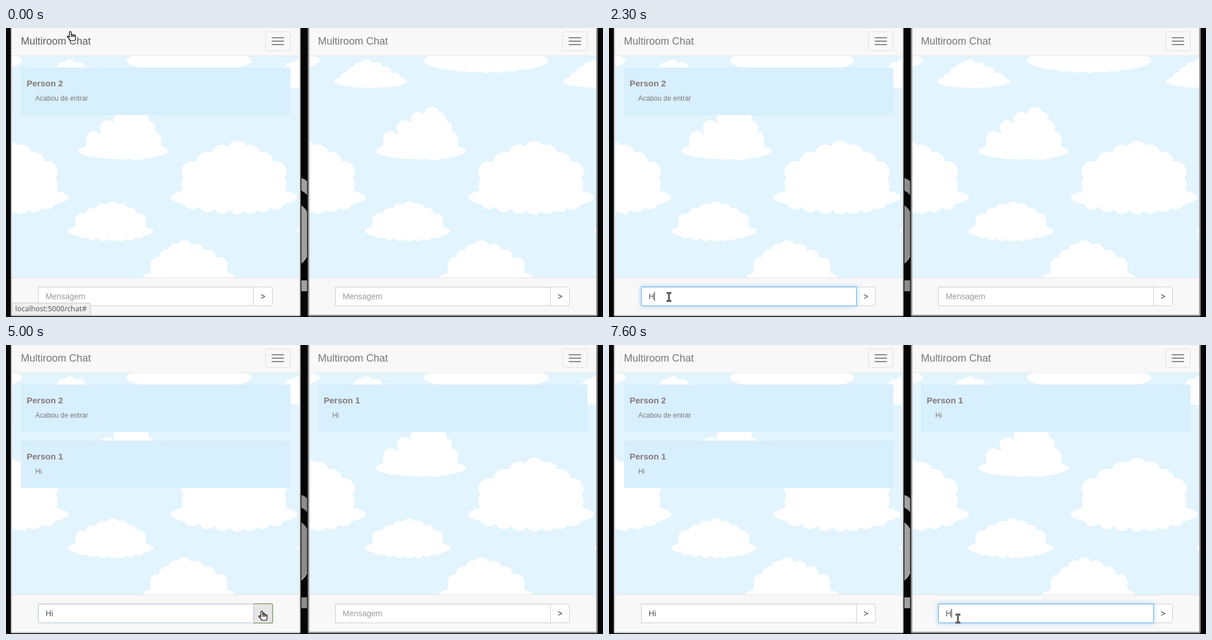
An HTML page that plays this animation: 1041 by 505 pixels, repeating every 8000 ms.

```html
<!DOCTYPE html>
<html lang="pt">
<head>
<meta charset="utf-8">
<title>Multiroom Chat</title>
<style>
  html, body { margin: 0; width: 100%; height: 100%; overflow: hidden; background: #000; }
  svg { display: block; position: absolute; left: 0; top: 0; }
  text { font-family: "Liberation Sans", Arial, sans-serif; font-size: 14px; fill: #555; white-space: pre; }
  .brand { font-size: 18px; fill: #777; }
  .name { font-size: 15px; font-weight: bold; fill: #857879; }
  .body { font-size: 12px; fill: #7d7678; }
  .hint { fill: #999; }
  .send { fill: #333; text-anchor: middle; }
  .status { font-family: "Noto Sans", "Open Sans", sans-serif; font-size: 12.7px; fill: #5a5a5a; }
</style>
</head>
<body>
<svg id="stage" width="1041" height="505" viewBox="0 0 1041 505"></svg>
<script>
const LOOP = 8000, STEP = 100, TILE = 399, SHIFT = 518;

const rect = (x, y, w, h, fill, more = "") =>
  `<rect x="${x}" y="${y}" width="${w}" height="${h}" fill="${fill}" ${more}/>`;
const circle = (x, y, r) => `<circle cx="${x}" cy="${y}" r="${r}"/>`;
const text = (x, y, cls, str, id = "") =>
  `<text x="${x}" y="${y}" class="${cls}" ${id && `id="${id}"`}>${str}</text>`;

// A flat base with a row of puffs falling away from the peak and a row of bumps below
function cloud({ x0, x1, peak, top, base, bottom, slope }) {
  const w = x1 - x0, r = .085 * w, inset = .17 * w, puffs = 7;
  const left = x0 + inset, right = x1 - inset, hull = [];
  let out = `<ellipse cx="${(x0 + x1) / 2}" cy="${base}" rx="${w / 2}" ry="${.09 * w}"/>`;
  for (let i = 0; i < puffs; i++) {
    const u = 2 * i / (puffs - 1) - 1;
    const x = peak + u * (u < 0 ? peak - left : right - peak);
    const y = top + r + (base - top) * slope * Math.abs(u) ** 1.5;
    hull.push([x, y]);
    out += circle(x, y, r) + circle(x, bottom - .8 * r - (bottom - base) * .3 * u * u, .8 * r);
    if (Math.abs(u) === 1) out += circle(x, (y + base) / 2, r);
  }
  hull.push([right, base + r / 2], [left, base + r / 2]);
  return out + `<path d="M${hull.join("L")}z"/>`;
}

const clouds = [
  { x0: 210, x1: 428, peak: 319, top: 0, base: 57, bottom: 79, slope: .3 },
  { x0: 54, x1: 182, peak: 111, top: 55, base: 93, bottom: 104, slope: .6 },
  { x0: 126, x1: 284, peak: 225, top: 138, base: 215, bottom: 231, slope: .55 },
  { x0: 287, x1: 508, peak: 403, top: 197, base: 296, bottom: 326, slope: .36 },
  { x0: 108, x1: 257, peak: 186, top: 303, base: 355, bottom: 373, slope: .4 },
  { x0: 238, x1: 400, peak: 311, top: 371, base: 436, bottom: 460, slope: .45 }
];

const message = (y, name, body, id = "") =>
  `<g ${id && `id="${id}"`}>${rect(26, y, 470, 83, "#d8effd")}
   ${text(36, y + 33, "name", name)}${text(51, y + 58, "body", body)}</g>`;

const pane = (side, dx, edge, line, messages) => `
  <g transform="translate(${dx})">
    ${rect(8.5, -9.5, 505, 513, edge, `rx="2" stroke="${line}"`)}
    ${rect(11, 0, 500, 501, "#f8f8f8")}
    <g clip-path="url(#sky)">${rect(11, 49, 500, 387, "#e2f4fd")}
      ${[0, TILE, -TILE].map(x => `<use href="#clouds" x="${x}"/>`).join("")}</g>
    ${rect(11, 48, 500, 1, "#e7e7e7")}${rect(11, 436, 500, 1, "#e4e4e4")}
    ${text(26, 29, "brand", "Multiroom Chat", side + "Brand")}
    ${rect(452.5, 6.5, 43, 33, "none", 'rx="4" stroke="#ddd"')}
    ${[0, 1, 2].map(i => rect(463, 16 + 6 * i, 22, 2, "#888", 'rx="1"')).join("")}
    ${messages}
    <path id="${side}Send" d="M431.5,452.5H461a3.5,3.5 0 0 1 3.5,3.5V482a3.5,3.5 0 0 1 -3.5,3.5H431.5z" fill="#fff" stroke="#ccc"/>
    ${text(448, 474, "send", "&gt;")}
    ${rect(431, 452, 34, 34, "none", `id="${side}Ring" rx="2" stroke="#93aa7c" stroke-width="1.6"`)}
    ${rect(56.5, 452.5, 375, 33, "#fff", 'stroke="#ccc"')}
    <g id="${side}Focus">
      ${rect(56, 452, 376, 34, "#66afe9", 'opacity=".6" filter="url(#glow)"')}
      ${rect(56.5, 452.5, 375, 33, "#fff", 'stroke="#66afe9"')}
    </g>
    ${rect(57, 453, 374, 1, "#000", 'opacity=".06"')}
    ${text(69, 474, "", "", side + "Text")}
    <path id="${side}Squiggle" d="M69,476.5${"l1.5,-1.5 1.5,1.5".repeat(4)}" fill="none" stroke="#e04a4a"/>
    ${rect(69, 461, 1, 16, "#333", `id="${side}Caret"`)}
  </g>`;

const stage = document.getElementById("stage");
stage.innerHTML = `
  <defs>
    <clipPath id="sky"><rect x="11" y="49" width="500" height="387"/></clipPath>
    <filter id="glow" x="-10%" y="-80%" width="120%" height="260%"><feGaussianBlur stdDeviation="4"/></filter>
    <g id="clouds" fill="#fff">${clouds.map(cloud).join("")}</g>
  </defs>
  ${rect(0, 0, 1041, 505, "#060606")}
  <g id="gap">
    <path d="M515,262Q521,264 525,268V292Q521,287 515,284zM515,310Q521,314 525,321V398Q521,407 515,411zM515,441H525V460H515z"/>
    <path d="M515,411Q521,407 525,398" fill="none" stroke="#ddd"/>
  </g>
  ${pane("left", 0, "#dedede", "#6b6b6b", message(69, "Person 2", "Acabou de entrar") + message(167, "Person 1", "Hi", "leftMsg"))}
  ${pane("right", SHIFT, "#999", "#6b6b6b", message(69, "Person 1", "Hi", "rightMsg"))}
  <g id="status">
    <path d="M10.5,480.5H144a3.5,3.5 0 0 1 3.5,3.5V501.5H10.5z" fill="#eee" stroke="#c8c8c8"/>
    ${text(16, 495, "status", "localhost:5000/chat#")}
  </g>
  <g id="cursor">
    <path id="hand" d="M-3.5,2V-6.2a1.6,1.6 0 0 1 3.2,0V-1.8a1.4,1.4 0 0 1 2.6,.3a1.4,1.4 0 0 1 2.6,.5a1.3,1.3 0 0 1 2.4,.9V4Q7.3,6 6,8H-2Q-3.5,5 -7,2Q-7.6,-.2 -5.5,.2zM-.3,-1.5V2M2.4,-1V2M5,-.6V2" fill="#fff" stroke="#000" stroke-width="1.2" stroke-linejoin="round"/>
    <path id="arrow" d="M0,0V15L3.6,11.6 6,17 8.4,16 6,10.7H11z" fill="#fff" stroke="#000"/>
    <g id="beam" fill="none">
      <path id="bar" d="M-4,-7H-1.5L0,-6 1.5,-7H4M0,-6V6M-4,7H-1.5L0,6 1.5,7H4" stroke="#000" stroke-width="2.8"/>
      <use href="#bar" style="display:none"/>
      <path d="M-3.4,-7H-1.5L0,-6 1.5,-7H3.4M0,-6V6M-3.4,7H-1.5L0,6 1.5,7H3.4" stroke="#fff" stroke-width=".8"/>
    </g>
  </g>`.replace('<use href="#bar" style="display:none"/>', "");

const el = {};
stage.querySelectorAll("[id]").forEach(n => el[n.id] = n);

// Pointer stops, eased in between
const stops = [
  { t: 0, x: 114, y: 14 },
  { t: 900, x: 104.5, y: 470 },
  { t: 3900, x: 104.5, y: 470 },
  { t: 4400, x: 402, y: 460 },
  { t: 4800, x: 448, y: 473 },
  { t: 5000, x: 448, y: 473 },
  { t: 5700, x: 610, y: 481 },
  { t: 6700, x: 608.5, y: 478 }
];

// Moments of each field: focus, blur, key presses, spans with the caret blinked off
const fields = {
  left: { focus: 1100, blur: 4900, keys: { H: 2300, i: 3400 }, off: [[1700, 2300], [3600, 4100]], spell: 4000 },
  right: { focus: 6600, blur: LOOP, keys: { H: 7600 }, off: [[7200, 7600]], spell: LOOP }
};

const clamp = v => Math.min(1, Math.max(0, v));
const within = (t, a, b) => t >= a && t < b;
const show = (node, on) => node.setAttribute("visibility", on ? "visible" : "hidden");

function pointer(t) {
  const i = stops.findIndex(s => s.t > t);
  if (i < 0) return stops[stops.length - 1];
  const a = stops[i - 1], b = stops[i];
  const u = (t - a.t) / (b.t - a.t), e = u * u * (3 - 2 * u);
  return { x: a.x + (b.x - a.x) * e, y: a.y + (b.y - a.y) * e };
}

function drawField(side, t, onSend) {
  const { focus, blur, keys, off, spell } = fields[side];
  const part = name => el[side + name];
  const value = Object.keys(keys).filter(k => t >= keys[k]).join("");
  const fade = at => clamp((t - at) / 120);
  const ring = side === "left" && within(t, blur, fields.right.focus);
  const dark = ring || side === "left" && onSend;

  part("Text").textContent = value || "Mensagem";
  part("Text").setAttribute("class", value ? "" : "hint");
  part("Focus").setAttribute("opacity", fade(focus) - fade(blur));
  part("Caret").setAttribute("x", 69 + (value ? Math.round(part("Text").getComputedTextLength()) : 0));
  show(part("Caret"), within(t, focus, blur) && !off.some(span => within(t, ...span)));
  show(part("Squiggle"), within(t, spell, blur));
  show(part("Ring"), ring);
  part("Send").setAttribute("fill", dark ? "#e6e6e6" : "#fff");
  part("Send").setAttribute("stroke", dark ? "#adadad" : "#ccc");
}

function draw(time) {
  const t = Math.floor(time % LOOP / STEP) * STEP;
  const { x, y } = pointer(t);
  const inRow = within(y, 452, 486);
  const onSend = inRow && within(x, 431, 466);
  const onInput = inRow && (within(x, 56, 431) || within(x, 574, 950));
  const onBrand = y < 48;

  for (const side in fields) drawField(side, t, onSend);
  show(el.leftMsg, t >= 5000);
  show(el.rightMsg, t >= 5000);
  show(el.status, t < 600);
  el.leftBrand.style.fill = onBrand ? "#5e5e5e" : "";
  el.gap.setAttribute("fill", within(t, fields.left.focus, fields.right.focus) ? "#8c8c8c" : "#a0a0a0");

  el.cursor.setAttribute("transform", `translate(${x.toFixed(1)},${y.toFixed(1)})`);
  show(el.hand, onBrand || onSend);
  show(el.beam, onInput);
  show(el.arrow, !onBrand && !onSend && !onInput);
}

const start = performance.now();
function tick() {
  draw(performance.now() - start);
  requestAnimationFrame(tick);
}
tick();
</script>
</body>
</html>
```
